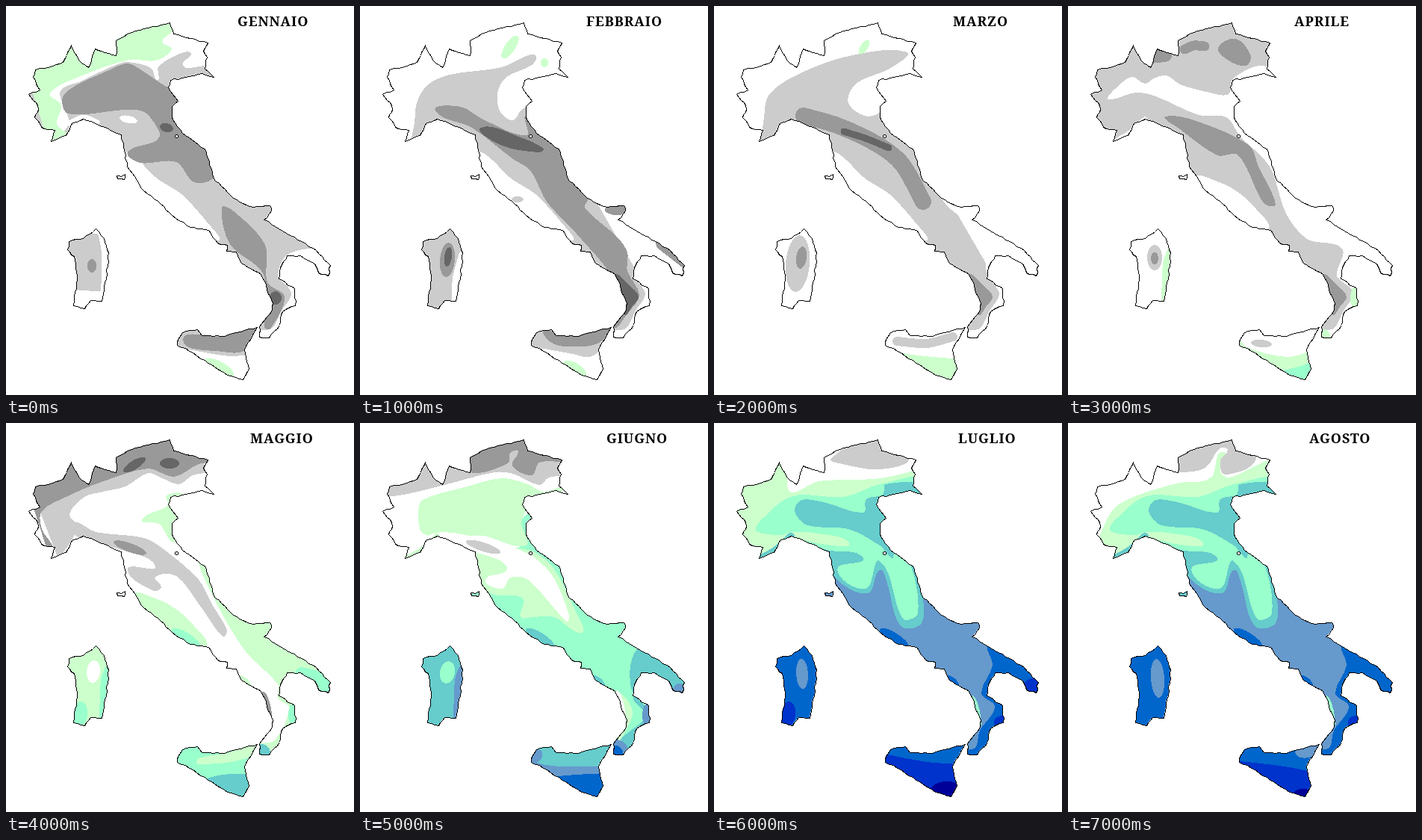
Recreate the animation shown at these times as an HTML page. Size 466 by 521 pixels, loop 8000 ms.

```html
<!DOCTYPE html>
<html lang="it">
<head>
<meta charset="utf-8">
<style>
html, body { margin: 0; width: 100%; height: 100%; overflow: hidden; background: #fff; }
svg { display: block; width: 466px; height: 521px; }
text { font: bold 18px "Noto Serif", serif; letter-spacing: .9px; }
</style>
</head>
<body>
<svg id="map" viewBox="0 0 466 521"></svg>
<script>
const WHITE = '#fff', LIGHT = '#ccc', MID = '#999', DARK = '#666', GREEN = '#cfc', AQUA = '#9fc',
      TEAL = '#6cc', STEEL = '#69c', BLUE = '#06c', ROYAL = '#03c', NAVY = '#009';

let seed = 7;
const random = () => (seed = seed * 16807 % 2147483647) / 2147483647;
const parse = text => text.split(' ').map(p => p.split(',').map(Number));

// Coast through a few capes and bays, roughened every few pixels.
function coast(text) {
  const pts = parse(text);
  return 'M' + pts.flatMap(([x, y], i) => {
    const [u, v] = pts[(i + 1) % pts.length], d = Math.hypot(u - x, v - y), steps = Math.ceil(d / 6);
    return Array.from({ length: steps }, (_, k) => {
      const t = k / steps, off = k ? (random() - .5) * 2 : 0;
      return [x + (u - x) * t - (v - y) / d * off, y + (v - y) * t + (u - x) / d * off].map(Math.round);
    });
  }).join('L') + 'Z';
}

const alps = '30,118 45,112 36,95 39,85 62,80 76,75 87,53 97,72 110,82 119,57 127,60 147,66 147,46 162,37 190,29 219,22 224,37 270,49 264,60 269,68 266,84 278,95 262,90 240,95 220,99 217,109';
const adriatic = '230,127 222,134 223,152 236,170 266,191 277,229 304,257 326,268 353,267 355,274 345,286 370,301 411,324 434,347 431,361 418,357 413,345 394,334 376,334 367,350';
const tyrrhene = '365,365 386,378 387,401 370,409 366,427 352,444 339,443 339,429 356,407 357,398 341,359 333,355 315,344 308,329 295,328 296,320 283,317 271,300 246,296 222,280 203,261 184,247 162,215 154,172 133,162 103,151 89,156 80,173 60,181 65,166 47,162 38,149 43,138 40,129';
const mainland = coast([alps, adriatic, tyrrhene].join(' '));
const sicily = coast('230,446 236,437 256,433 262,441 292,442 336,430 319,460 325,486 317,500 296,494 270,478 245,462 229,454');
const sardinia = coast('120,298 131,311 137,330 134,365 128,395 113,394 105,405 90,401 95,366 91,335 82,326 84,315 103,311');
const elba = coast('148,227 154,228 159,225 158,232 149,231');
const coasts = mainland + sicily + sardinia + elba;

// Smooth curve whose handles scale with each segment, so it cannot overshoot.
function smooth(text, closed) {
  const pts = parse(text), n = pts.length;
  const at = i => closed ? pts[(i + n) % n] : pts[Math.max(0, Math.min(n - 1, i))];
  const handle = (i, reach) => {
    const [ax, ay] = at(i - 1), [bx, by] = at(i + 1), d = Math.hypot(bx - ax, by - ay) || 1;
    return [at(i)[0] + (bx - ax) / d * reach, at(i)[1] + (by - ay) / d * reach];
  };
  let d = 'M' + pts[0];
  for (let i = 0; i < (closed ? n : n - 1); i++) {
    const [x, y] = at(i), [u, v] = at(i + 1), reach = Math.hypot(u - x, v - y) * .3;
    d += 'C' + [handle(i, reach), handle(i + 1, -reach), at(i + 1)];
  }
  return d;
}

let layer = '';
const land = (color, d) => { layer += `<path d="${d}" fill="${color}"/>`; };
const area = (color, text) => land(color, smooth(text, true) + 'Z');
const above = (color, text) => land(color, smooth(text) + 'L466,0L0,0Z');
const below = (color, text) => land(color, smooth(text) + 'L466,521L0,521Z');
const band = (color, width, text) => {
  layer += `<path d="${smooth(text)}" fill="none" stroke="${color}" stroke-width="${width}" stroke-linecap="round"/>`;
};
const oval = (color, x, y, rx, ry, turn = 0) => {
  layer += `<ellipse rx="${rx}" ry="${ry}" fill="${color}" transform="translate(${x} ${y}) rotate(${turn})"/>`;
};

// Zones that recur from month to month.
const latium = color => area(color, '150,193 205,233 235,252 268,288 284,314 200,290 150,240');
const maremma = color => area(color, '172,230 205,237 230,251 252,272 268,299 225,295');
const pontine = color => area(color, '222,277 243,281 260,301 235,302');
const ionian = color => area(color, '371,367 382,386 369,408 356,432 335,436 335,460 400,400');
const calabria = color => area(color, '341,360 360,374 373,389 364,403 354,414 350,387');
const cape = color => oval(color, 386, 391, 8, 16);
const strait = (color, size = 12) => oval(color, 342, 442, size, size);
const gulf = color => oval(color, 319, 346, 11, 5, 40);
const liguria = (color, width) => band(color, width, '62,182 83,170 103,152');
const eastSardinia = color => band(color, 12, '138,330 133,345 131,400');
const southSardinia = color => oval(color, 98, 391, 11, 18, 10);

function january() {
  land(LIGHT, mainland);
  above(WHITE, '60,190 84,158 80,140 73,114 100,101 155,76 177,77 195,84 203,99 204,82 228,66 248,63 237,76 241,83 275,78');
  above(GREEN, '60,195 84,176 68,158 74,133 59,117 100,94 165,72 200,73 222,58 209,48 222,35');
  band(WHITE, 7, '85,157 104,149 122,156');
  oval(WHITE, 164, 152, 12, 5, 12);
  latium(WHITE); ionian(WHITE);
  area(WHITE, '366,366 368,345 380,331 415,326 450,350 400,380');
  area(MID, '78,118 140,85 163,77 183,87 215,108 242,115 226,150 275,195 280,228 252,236 228,209 180,210 163,196 200,181 206,170 180,140 83,144');
  area(MID, '289,270 305,275 347,320 350,370 373,390 354,432 346,430 345,360 300,319');
  oval(DARK, 215, 163, 9, 6, 15); oval(DARK, 361, 391, 8, 9);
  land(LIGHT, sicily);
  area(MID, '237,447 290,443 336,429 320,461 290,463');
  below(WHITE, '225,456 250,461 300,469 330,466');
  oval(GREEN, 285, 485, 22, 9, 28);
  land(WHITE, sardinia);
  area(LIGHT, '75,305 105,305 124,308 127,380 118,382 85,374');
  oval(MID, 115, 348, 6, 9);
}

function february() {
  below(LIGHT, '73,157 76,130 90,106 120,92 190,82 225,66 236,67 230,79 195,96 184,117 188,142 205,153 217,138 240,130');
  oval(GREEN, 201, 55, 7, 18, 34); oval(GREEN, 247, 76, 5, 6);
  latium(WHITE); ionian(WHITE);
  oval(LIGHT, 211, 259, 8, 4);
  area(MID, '101,140 135,135 165,152 223,173 222,148 290,200 306,257 301,270 345,310 358,330 358,355 374,387 358,412 340,430 342,372 290,305 250,262 228,220 205,205 150,163');
  area(DARK, '162,163 215,176 246,191 240,196 190,187');
  oval(MID, 344, 273, 16, 7); band(MID, 18, '405,318 437,343');
  calabria(DARK);
  land(LIGHT, sicily);
  area(MID, '246,434 270,441 336,428 318,452 275,456 255,450');
  below(WHITE, '225,455 285,466 308,470 330,455');
  oval(GREEN, 287, 487, 18, 9, 32);
  land(LIGHT, sardinia);
  band(WHITE, 16, '140,335 132,365 131,400');
  oval(MID, 117, 340, 10, 23, 5); oval(DARK, 118, 336, 5, 13, 8);
}

function march() {
  below(LIGHT, '66,157 74,118 120,88 185,66 258,62 235,84 190,104 180,130 208,148 240,130');
  latium(WHITE); ionian(WHITE);
  area(WHITE, '290,215 310,265 366,312 368,360 450,370 450,260');
  band(MID, 22, '120,147 165,160 220,186 252,212 280,262');
  band(DARK, 9, '174,168 205,178 234,190');
  calabria(MID);
  oval(GREEN, 201, 55, 5, 11, 34);
  land(WHITE, sicily);
  band(LIGHT, 12, '245,449 285,452 320,443');
  below(GREEN, '225,458 265,467 330,473');
  land(WHITE, sardinia);
  oval(LIGHT, 112, 345, 16, 38, 5); oval(MID, 117, 337, 7, 15, 8);
}

function april() {
  land(LIGHT, mainland);
  area(WHITE, '54,125 62,112 85,95 103,104 115,97 132,93 150,105 190,116 215,118 222,96 266,82 460,250 460,400 362,365 367,325 320,312 292,278 270,215 230,174 212,149 175,146 115,120 90,116');
  maremma(WHITE); liguria(WHITE, 7); ionian(WHITE);
  band(MID, 18, '110,68 130,66'); band(MID, 13, '156,58 168,53 183,54');
  area(MID, '201,56 225,44 245,67 238,80 215,73');
  area(MID, '131,148 180,157 243,187 255,215 278,266 262,264 228,200 200,200 150,165');
  calabria(MID); cape(GREEN); strait(GREEN, 9);
  land(WHITE, sicily);
  oval(LIGHT, 259, 452, 14, 5, 5);
  below(GREEN, '225,440 240,457 295,470 330,460');
  below(AQUA, '280,490 305,484 335,475');
  land(WHITE, sardinia);
  oval(LIGHT, 116, 337, 10, 17); oval(MID, 116, 338, 5, 8);
  eastSardinia(GREEN);
}

function may() {
  above(LIGHT, '70,182 86,160 95,138 85,122 105,99 130,92 160,85 190,67 207,73 232,82 250,70 285,65');
  area(LIGHT, '88,132 120,146 185,154 215,172 258,210 276,243 296,278 290,286 260,245 228,205 200,206 208,220 198,225 163,196 200,192 155,170 95,152');
  above(MID, '60,185 64,168 48,142 48,118 85,97 125,80 190,61 225,72 258,55 285,52');
  oval(DARK, 172, 56, 17, 6, -32); oval(DARK, 219, 54, 13, 7);
  oval(MID, 166, 167, 23, 6, 20);
  area(GREEN, '182,130 217,110 215,97 240,97 240,130 226,160 205,135');
  maremma(GREEN); pontine(AQUA);
  area(GREEN, '262,182 273,224 320,305 364,350 364,368 379,382 360,425 335,432 335,455 400,400 460,340 350,250');
  band(AQUA, 18, '396,336 420,343 434,360');
  cape(AQUA); strait(TEAL); gulf(GREEN);
  oval(MID, 349, 378, 5, 19, -15);
  land(AQUA, sicily);
  area(GREEN, '256,457 258,449 300,441 336,428 322,449');
  below(TEAL, '255,480 290,471 330,470');
  land(GREEN, sardinia);
  oval(WHITE, 117, 333, 9, 15, 5);
  eastSardinia(AQUA); southSardinia(AQUA);
}

function june() {
  land(AQUA, mainland);
  above(WHITE, '60,260 157,185 215,165 216,130 240,112');
  above(LIGHT, '10,94 45,98 105,85 180,66 205,68 240,83 253,73 285,70');
  area(MID, '145,38 148,66 198,54 201,40 212,38 204,57 230,70 240,53 278,46 225,8');
  area(GREEN, '78,120 84,103 140,86 190,74 225,82 245,92 285,83 235,104 216,132 222,164 165,151 86,149');
  area(GREEN, '140,172 225,170 258,193 290,255 297,281 260,260 230,260 215,260 218,235 180,230 160,219');
  area(WHITE, '95,149 160,154 225,175 258,205 280,258 277,266 225,210 202,207 190,222 168,210 197,197 185,183 130,166');
  oval(LIGHT, 165, 166, 24, 6, 18);
  liguria(GREEN, 8); pontine(TEAL); gulf(TEAL);
  area(TEAL, '376,300 450,315 450,370 398,350 366,366 382,392 360,414 335,435 335,460 400,410 363,355');
  area(GREEN, '341,360 358,371 365,390 354,415 342,431');
  oval(WHITE, 349, 381, 5, 23, -12);
  oval(STEEL, 428, 358, 9, 9); cape(STEEL);
  strait(STEEL, 18); strait(BLUE, 10);
  land(TEAL, sicily);
  oval(STEEL, 234, 446, 11, 9, -30);
  below(STEEL, '225,446 240,456 270,460 330,460');
  below(BLUE, '255,474 290,471 330,469');
  land(TEAL, sardinia);
  oval(AQUA, 117, 334, 10, 15, 10);
  eastSardinia(STEEL);
  land(AQUA, elba);
}

// Zones common to the two driest months.
function dryZones() {
  area(TEAL, '145,168 215,160 222,130 265,187 278,225 278,268 250,272 232,215 222,197 206,228 165,210');
  area(AQUA, '57,145 62,131 105,98 175,99 222,82 290,80 235,165 262,187 273,255 253,262 222,185 203,222 165,196 200,181 150,170 100,152');
  area(GREEN, '85,160 100,147 140,148 181,161 150,163 100,153');
  area(TEAL, '108,118 118,103 150,107 200,120 204,102 226,96 230,82 285,88 240,100 240,180 222,164 180,142 125,137');
  liguria(TEAL, 10); pontine(BLUE); gulf(BLUE);
  area(BLUE, '368,296 373,325 358,362 376,380 356,412 350,435 335,440 335,460 400,400 450,370 450,310');
  oval(AQUA, 351, 387, 5, 22, -12); oval(ROYAL, 386, 401, 11, 9);
}

function july() {
  land(STEEL, mainland);
  above(GREEN, '0,260 157,190 225,165 240,115 466,100');
  area(WHITE, '100,90 118,40 225,10 285,45 235,72 140,78');
  area(LIGHT, '156,48 225,10 262,46 222,62 172,55');
  dryZones();
  oval(ROYAL, 428, 354, 14, 12);
  land(BLUE, sicily);
  below(ROYAL, '222,442 285,454 330,457');
  oval(NAVY, 312, 492, 22, 12);
  land(BLUE, sardinia);
  oval(STEEL, 118, 336, 8, 20, -3);
  southSardinia(ROYAL);
  land(STEEL, elba);
}

function august() {
  land(STEEL, mainland);
  above(GREEN, '0,260 157,190 225,165 240,115 466,100');
  above(WHITE, '0,200 36,162 60,116 90,98 150,80 180,78 194,70 201,42 211,40 204,65 216,73 260,53 290,40');
  area(LIGHT, '142,62 145,30 225,8 252,48 210,69 204,50 214,36 203,34 184,60 152,66');
  dryZones();
  land(BLUE, sicily);
  oval(STEEL, 321, 438, 17, 10, -15);
  below(ROYAL, '222,452 290,460 330,468');
  oval(NAVY, 315, 496, 12, 6);
  land(BLUE, sardinia);
  oval(STEEL, 120, 342, 9, 26, -4);
  land(TEAL, elba);
}

const months = [
  ['GENNAIO', 310, january], ['FEBBRAIO', 303, february], ['MARZO', 320, march], ['APRILE', 303, april],
  ['MAGGIO', 327, may], ['GIUGNO', 330, june], ['LUGLIO', 327, july], ['AGOSTO', 323, august]
];

const sheets = months.map(([name, x, paint]) => {
  layer = '';
  paint();
  return `<g class="month" display="none"><g clip-path="url(#coast)">${layer}</g><text x="${x}" y="27">${name}</text></g>`;
});
document.getElementById('map').innerHTML =
  `<clipPath id="coast"><path d="${coasts}"/></clipPath>
  <g shape-rendering="crispEdges">${sheets.join('')}
  <g transform="translate(.5 .5)" stroke="#000"><path d="${coasts}" fill="none"/>
  <circle cx="228" cy="174" r="2" fill="#fff"/></g></g>`;

const groups = document.querySelectorAll('.month');
let shown = -1;
function tick() {
  const now = Math.floor(performance.now() / 1000) % months.length;
  if (now !== shown) {
    groups.forEach((g, i) => g.setAttribute('display', i === now ? 'inline' : 'none'));
    shown = now;
  }
  requestAnimationFrame(tick);
}
tick();
</script>
</body>
</html>
```
